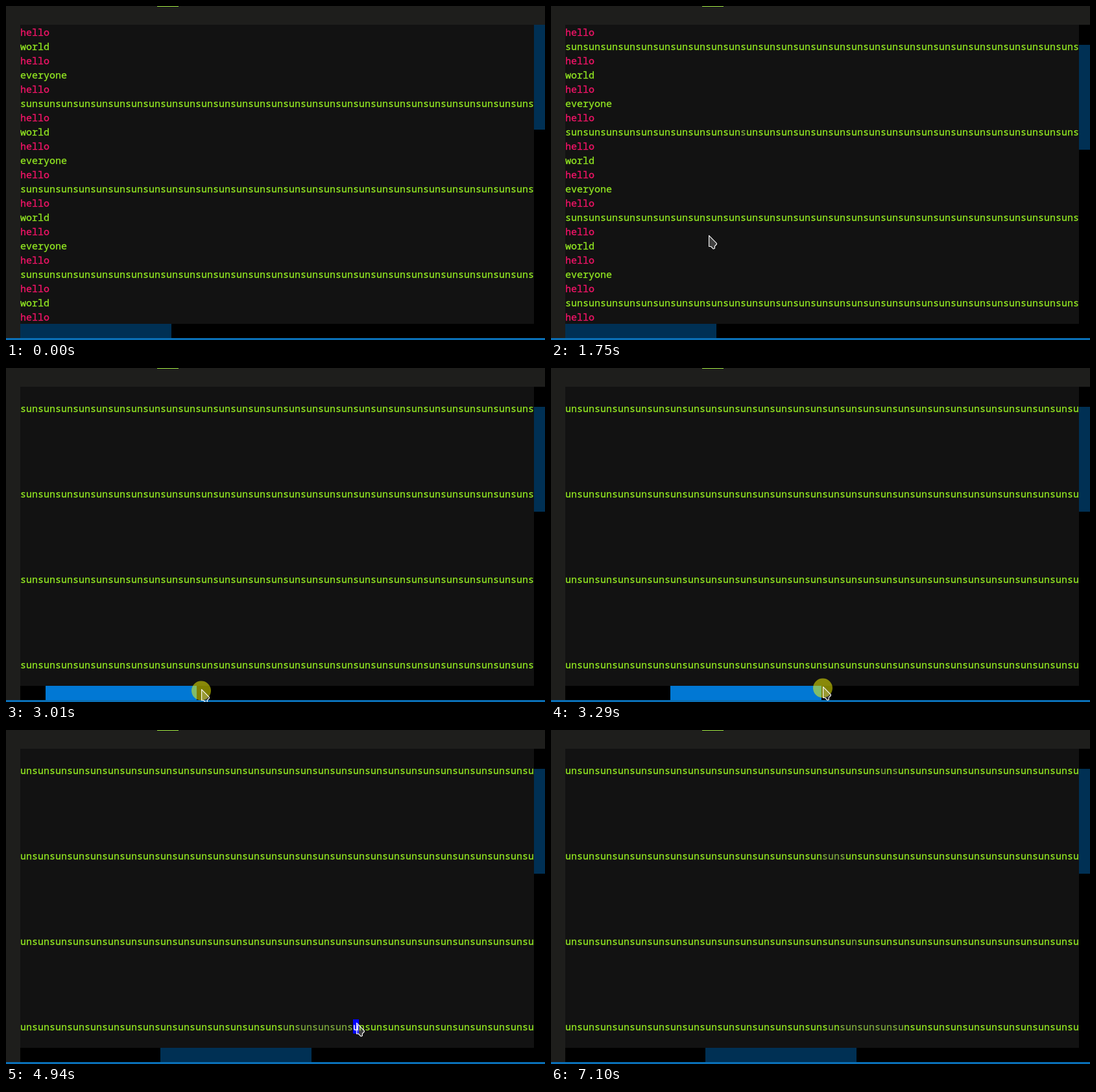
Write an HTML page that moves like this. It is 831 px wide and 516 px high and loops after 7670 ms.

```html
<!DOCTYPE html>
<html lang="en">
<head>
<meta charset="utf-8">
<title>Scrolling panel</title>
<style>
  html, body { margin: 0; width: 100%; height: 100%; overflow: hidden; background: #1e1e1c; }
  svg { display: block; width: 831px; height: 516px; }
  text {
    font: 500 15px "Noto Sans Mono", "DejaVu Sans Mono", monospace;
    white-space: pre; stroke-width: .3px;
  }
</style>
</head>
<body>
<svg viewBox="0 0 831 516">
  <rect width="831" height="516" fill="#1e1e1c"/>
  <rect x="233" width="33" height="1" fill="#a0e840"/>
  <rect x="22" y="29" width="809" height="484" fill="#000"/>
  <rect x="22" y="29" width="792" height="462" fill="#121212"/>
  <g id="rows"></g>
  <g id="cells"></g>
  <rect id="vthumb" x="814" width="17" height="162" fill="#003054"/>
  <rect id="hthumb" y="491" width="233" height="22"/>
  <rect y="513" width="831" height="3" fill="#0a6fb6"/>
  <g id="pointer">
    <circle id="press" cy="2.5" r="15" fill="#ff0" fill-opacity=".5"/>
    <path d="M.6 .6V17.5H3.5L7.3 21.3L9.4 20.4V17.2L12.4 14V12.6Z"
      fill="#fff" fill-opacity=".2" stroke="#fff" stroke-width="1.1" stroke-linejoin="round"/>
  </g>
</svg>
<script>
const LOOP = 7670, LEFT = 22, TOP = 29, CW = 9, RH = 22, COLS = 88, ROWS = 21, WIDTH = 300;
const GREEN = '#94ea22', RED = '#f8146a', FADE = '#7fac3e', PANEL = '#121212';
const LINES = ['hello', 'world', 'hello', 'everyone', 'hello', 'sun'.repeat(WIDTH / 3)]
  .map(s => s.padEnd(WIDTH));

const SCROLL = 1100, DRAG = 2730, DROP = 3570, LAG = 90;

const move = (from, to, x, y, bend = 0) => ({ from, to, x, y, bend });
const MOVES = [
  move(40, 360, 354, 89),
  move(1390, 1970, 226, 478, -28),
  move(1970, 2150, 225, 487),
  move(2320, 2440, 225, 498),
  move(DRAG, 3430, 441, 491),
  move(3530, 3810, 430, 460),
  move(4140, 4180, 456, 456),
  move(4180, 4560, 544, 456),
  move(4560, 4940, 540, 452),
  move(4940, 5740, 448, 178, -30),
  move(5860, 6060, 450, 197),
  move(6060, 6660, 446, 116, -48),
  move(6660, 7080, 640, -30)
];

const $ = id => document.getElementById(id);
const within = (t, a, b) => t >= a && t < b;
const ease = u => u * u * (3 - 2 * u);

function pointerAt(t) {
  let x = 580, y = -40;
  for (const m of MOVES) {
    if (t <= m.from) break;
    const e = ease(Math.min(1, (t - m.from) / (m.to - m.from)));
    x += (m.x - x) * e + m.bend * 4 * e * (1 - e);
    y += (m.y - y) * e;
  }
  return [x, y];
}

const textAt = (row, col, str, fill) =>
  `<text x="${LEFT + col * CW}" y="${TOP + 17 + row * RH}" fill="${fill}" stroke="${fill}">${str}</text>`;

const cellAt = (row, col, str, fill, back) =>
  `<rect x="${LEFT + col * CW}" y="${TOP + row * RH}" width="${CW}" height="${RH}" fill="${back}"/>` +
  textAt(row, col, str, fill);

const shown = {};
function setMarkup(id, html) {
  if (shown[id] !== html) $(id).innerHTML = shown[id] = html;
}

function draw(t) {
  const down = t < SCROLL ? 0 : t < SCROLL + 80 ? 2 : 4;
  const drag = t < DRAG ? 0 : Math.round(pointerAt(Math.min(t - LAG, 3530))[0] - 225);
  const shift = Math.round(drag * WIDTH / (COLS * CW));
  const lines = Array.from({ length: ROWS }, (_, r) =>
    LINES[(r + down) % LINES.length].slice(shift, shift + COLS));

  // The character under the pointer at a given time, if there is one.
  const hit = time => {
    const [x, y] = pointerAt(time);
    const row = Math.floor((y - TOP) / RH), col = Math.floor((x - LEFT) / CW);
    const char = lines[row]?.[col] ?? ' ';
    return char === ' ' ? null : { row, col, char };
  };
  const paint = (h, fill, back) => cellAt(h.row, h.col, h.char, fill, back);

  // Characters the pointer passed stay faded until the text scrolls.
  const faded = new Set();
  for (let s = t < DRAG + 70 ? 1220 : DROP; s <= t - 80; s += 20) {
    const h = hit(s);
    if (h) faded.add(paint(h, FADE, PANEL));
  }
  const hover = t > DROP && hit(t - 40);

  setMarkup('rows', lines.map((s, r) => textAt(r, 0, s, (r + down) % 2 ? GREEN : RED)).join(''));
  setMarkup('cells', [...faded].join('') + (hover ? paint(hover, '#fff', '#00f') : ''));

  $('vthumb').setAttribute('y', TOP + Math.round(down * 7.7));
  $('hthumb').setAttribute('x', LEFT + drag);
  $('hthumb').setAttribute('fill',
    within(t, DRAG + 40, DROP) ? '#0178d4' : within(t, 2400, DROP + 80) ? '#003c69' : '#003054');

  const [x, y] = pointerAt(t).map(Math.round);
  $('pointer').setAttribute('transform', `translate(${x} ${y})`);
  const pressed = within(t, 610, 690) || within(t, DRAG, DROP);
  $('press').setAttribute('visibility', pressed ? 'visible' : 'hidden');
}

const begin = performance.now();
function tick() {
  draw((performance.now() - begin) % LOOP);
  requestAnimationFrame(tick);
}
tick();
</script>
</body>
</html>
```
